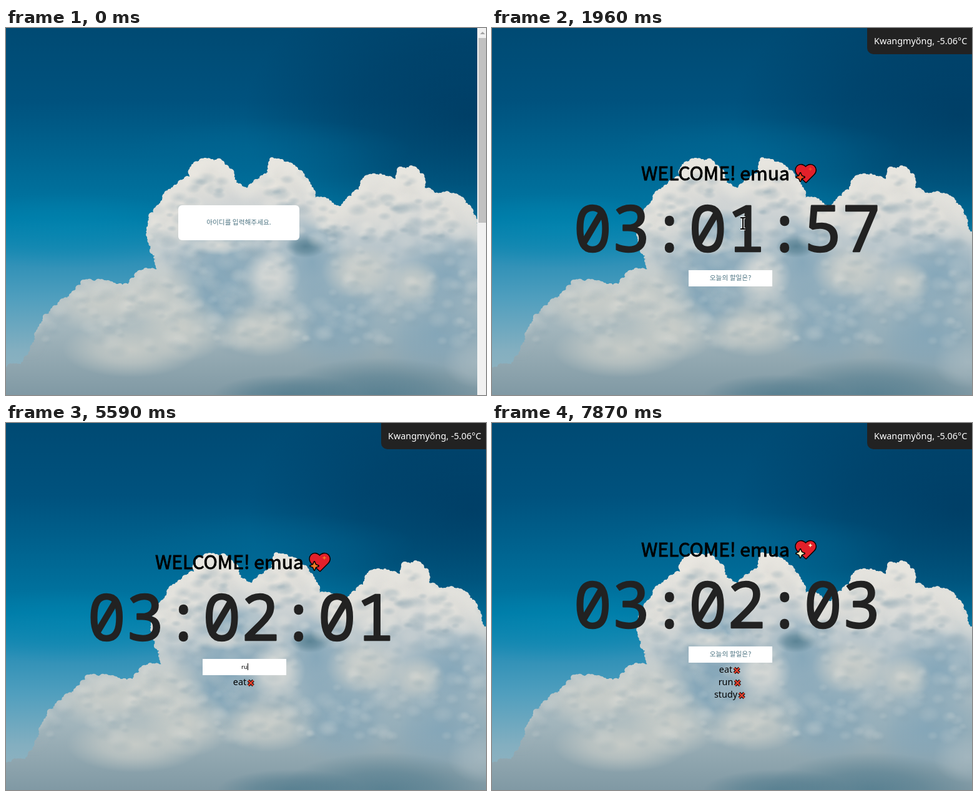
Write an HTML page with a canvas that moves like this. It is 769 by 588 pixels and loops after 8000 ms.

```html
<!DOCTYPE html>
<html lang="ko">
<head>
<meta charset="utf-8">
<title>Clock</title>
<style>
html, body { margin: 0; width: 100%; height: 100%; overflow: hidden; }
canvas { display: block; width: 769px; height: 588px; }
</style>
</head>
<body>
<canvas id="stage" width="769" height="588"></canvas>
<script>
const W = 769, H = 588, LOOP = 8000;
const ctx = document.getElementById('stage').getContext('2d');
const KOREAN = '"Noto Sans CJK KR", "Noto Sans CJK JP", "Noto Sans CJK", sans-serif';
const LATIN = '"Noto Sans", sans-serif';
const BLINK = 530, LOGIN = 1960;
const CLICKS = [610, 3320];
const TICKS = [2160, 3160, 4190, 5190, 6190, 7190];
const ENTRIES = [
  { word: 'emua', keys: [1410, 1510, 1610, 1760], sent: LOGIN },
  { word: 'eat', keys: [4120, 4260, 4390], sent: 4990 },
  { word: 'run', keys: [5460, 5590, 5860], sent: 6260 },
  { word: 'study', keys: [6460, 6660, 6860, 7120, 7340], sent: 7610 }
];
const [visitor, ...todos] = ENTRIES;

let seed = 11;
function random() {
  seed = (seed * 16807) % 2147483647;
  return seed / 2147483647;
}

function verticalGradient(c, stops) {
  const g = c.createLinearGradient(0, 0, 0, H);
  for (const [at, color] of stops) g.addColorStop(at, color);
  return g;
}

// Soft ellipse; rgb is a "r,g,b" string.
function glow(c, x, y, rx, ry, rgb, alpha) {
  c.save();
  c.translate(x, y);
  c.scale(rx, ry);
  const g = c.createRadialGradient(0, 0, 0, 0, 0, 1);
  g.addColorStop(0, `rgba(${rgb},${alpha})`);
  g.addColorStop(0.5, `rgba(${rgb},${alpha * 0.65})`);
  g.addColorStop(1, `rgba(${rgb},0)`);
  c.fillStyle = g;
  c.fillRect(-1, -1, 2, 2);
  c.restore();
}

const RIDGE = [
  [-12, 548], [12, 540], [24, 541], [42, 516], [50, 490], [64, 462], [86, 441], [110, 425],
  [124, 407], [148, 406], [178, 412], [196, 414], [210, 395], [224, 388], [250, 390],
  [240, 372], [232, 345], [227, 325], [234, 300], [249, 284], [258, 264], [276, 251],
  [295, 239], [300, 220], [319, 211], [341, 213], [360, 230], [370, 249], [386, 262],
  [401, 246], [420, 233], [426, 210], [441, 213], [460, 222], [475, 235], [487, 252],
  [494, 274], [515, 275], [534, 292], [547, 276], [570, 256], [573, 241], [600, 235],
  [624, 247], [632, 227], [649, 223], [666, 236], [668, 256], [690, 267], [712, 265],
  [734, 277], [747, 297], [755, 325], [775, 335]
];

function cloudPath() {
  const path = new Path2D();
  path.moveTo(-12, H + 9);
  for (const [x, y] of RIDGE) path.lineTo(x, y);
  path.lineTo(775, H + 9);
  path.closePath();
  for (let i = 1; i < RIDGE.length; i++) {
    const [x0, y0] = RIDGE[i - 1], [x1, y1] = RIDGE[i];
    const count = Math.ceil(Math.hypot(x1 - x0, y1 - y0) / 6);
    for (let k = 0; k < count; k++) {
      const x = x0 + (x1 - x0) * k / count, y = y0 + (y1 - y0) * k / count + 1;
      const r = 2 + random() * 4;
      path.moveTo(x + r, y);
      path.arc(x, y, r, 0, 7);
    }
  }
  return path;
}

const SHADES = [
  ['128,164,184', [[350, 385, 85, 75], [335, 440, 65, 60], [490, 375, 60, 85], [530, 470, 95, 75],
    [705, 395, 80, 70], [690, 490, 100, 70], [365, 320, 50, 30]]],
  ['82,124,142', [[600, 590, 170, 62], [480, 350, 32, 18], [450, 590, 120, 35]]],
  ['226,224,218', [[320, 240, 62, 50], [265, 305, 55, 52], [340, 348, 45, 16], [440, 245, 62, 48],
    [425, 398, 48, 42], [650, 250, 55, 50], [590, 285, 75, 60], [710, 295, 60, 45], [520, 298, 48, 32]]],
  ['206,208,202', [[150, 440, 85, 50], [235, 430, 85, 62], [285, 480, 70, 55], [655, 408, 42, 36],
    [570, 390, 65, 45], [410, 485, 80, 42], [200, 515, 110, 45]]]
];

function paintSky() {
  const canvas = document.createElement('canvas');
  canvas.width = W;
  canvas.height = H;
  const c = canvas.getContext('2d');
  c.fillStyle = verticalGradient(c, [[0, '#004a73'], [0.2, '#00527e'], [0.34, '#00638f'],
    [0.52, '#0079a5'], [0.63, '#2c8fb6'], [0.74, '#519fbe'], [0.88, '#84afc0'], [1, '#97b4bf']]);
  c.fillRect(0, 0, W, H);
  c.translate(7, 0);
  glow(c, 740, 140, 360, 220, '0,56,94', 0.75);
  glow(c, 100, 325, 230, 60, '0,137,180', 0.55);
  glow(c, 420, 195, 230, 50, '0,105,150', 0.4);

  const cloud = cloudPath();
  c.save();
  c.clip(cloud);
  c.fillStyle = verticalGradient(c, [[0.35, '#dddcd8'], [0.5, '#ced3d4'], [0.65, '#adbec6'],
    [0.82, '#a2b5bc'], [1, '#8099a4']]);
  c.fillRect(-12, 0, W + 20, H);
  for (const [rgb, spots] of SHADES)
    for (const spot of spots) glow(c, ...spot, rgb, 0.85);
  for (let i = 0; i < 420; i++) {
    const x = random() * 760, y = 215 + random() * 290, r = 7 + random() * 13;
    const strength = y < 340 ? 0.3 : 0.15;
    glow(c, x, y, r, r * 0.8, '235,232,225', strength);
    glow(c, x + r * 0.5, y + r * 0.8, r, r * 0.6, '130,158,172', strength);
  }
  c.filter = 'blur(6px)';
  c.lineWidth = 16;
  c.strokeStyle = verticalGradient(c, [[0.35, 'rgba(238,235,228,.65)'],
    [0.65, 'rgba(222,222,216,.4)'], [0.9, 'rgba(190,200,200,0)']]);
  c.stroke(cloud);
  c.restore();
  glow(c, 755, 535, 55, 42, '170,188,196', 0.7);
  return canvas;
}

const sky = paintSky();

function write(text, x, y, font, color, align = 'left') {
  ctx.font = font;
  ctx.fillStyle = color;
  ctx.textAlign = align;
  ctx.fillText(text, x, y);
}

function box(x, y, w, h, color, radius = 0) {
  ctx.fillStyle = color;
  ctx.beginPath();
  ctx.roundRect(x, y, w, h, radius);
  ctx.fill();
}

function typed(entry, t) {
  return entry.word.slice(0, entry.keys.filter(k => k <= t).length);
}

function caretOn(t) {
  if (t < CLICKS[0] || (t >= LOGIN && t < CLICKS[1])) return false;
  const resets = [...CLICKS, ...ENTRIES.flatMap(e => e.keys)].filter(k => k <= t);
  return Math.floor((t - Math.max(...resets)) / BLINK) % 2 === 0;
}

function field(value, hint, cx, top, t) {
  let caretX = cx;
  if (value) {
    write(value, cx, top + 9, '9.6px ' + LATIN, '#000', 'center');
    caretX = Math.round(cx + ctx.measureText(value).width / 2);
  } else {
    write(hint, cx, top + 9, '10.7px ' + KOREAN, '#4d7482', 'center');
  }
  if (caretOn(t)) box(caretX, top, 1, 11, '#000');
}

function star(x, y, r, color, outlined) {
  ctx.beginPath();
  for (let i = 0; i < 8; i++) {
    const a = i * Math.PI / 4, d = i % 2 ? r * 0.42 : r;
    ctx.lineTo(x + Math.sin(a) * d, y - Math.cos(a) * d);
  }
  ctx.closePath();
  if (outlined) ctx.stroke();
  ctx.fillStyle = color;
  ctx.fill();
}

function heart(sparkle) {
  ctx.strokeStyle = '#000';
  ctx.lineJoin = 'round';
  ctx.lineWidth = 3;
  ctx.fillStyle = '#e3202a';
  ctx.beginPath();
  ctx.moveTo(503, 247);
  ctx.lineTo(490, 235);
  ctx.bezierCurveTo(481, 225, 493, 213, 502.5, 223);
  ctx.bezierCurveTo(512, 213, 524, 225, 516, 234);
  ctx.closePath();
  ctx.stroke();
  ctx.fill();
  star(494, 239, 6.5, sparkle, true);
  star(510, 226, 3.6, sparkle);
}

function cross(x, y) {
  for (const [width, color] of [[4.6, '#1c1010'], [2.4, '#e8402c']]) {
    ctx.strokeStyle = color;
    ctx.lineWidth = width;
    ctx.beginPath();
    ctx.moveTo(x - 4, y - 4);
    ctx.lineTo(x + 4, y + 4);
    ctx.moveTo(x + 4, y - 4);
    ctx.lineTo(x - 4, y + 4);
    ctx.stroke();
  }
}

function beam(x, y) {
  for (const [width, color] of [[4, '#fff'], [2, '#000']]) {
    ctx.strokeStyle = color;
    ctx.lineWidth = width;
    ctx.beginPath();
    ctx.moveTo(x - 4, y - 9);
    ctx.lineTo(x + 4, y - 9);
    ctx.moveTo(x, y - 9);
    ctx.lineTo(x, y + 9);
    ctx.moveTo(x - 4, y + 9);
    ctx.lineTo(x + 4, y + 9);
    ctx.stroke();
  }
}

function arrow(x, y) {
  ctx.beginPath();
  for (const [dx, dy] of [[0, 0], [0, 16], [4, 12.5], [6.5, 18], [9, 17], [6.5, 11.5], [11.5, 11.5]])
    ctx.lineTo(x + dx, y + dy);
  ctx.closePath();
  ctx.fillStyle = '#fff';
  ctx.fill();
  ctx.strokeStyle = '#000';
  ctx.lineWidth = 1;
  ctx.stroke();
}

// Eased move that advances in ten discrete steps.
function glide(t, start, end, from, to) {
  const p = Math.min(1, Math.max(0, Math.floor((t - start) / (end - start) * 9 + 0.01) / 9));
  const e = 1 - (1 - p) ** 3;
  return from.map((v, i) => v + (to[i] - v) * e);
}

function pointer(t) {
  if (t < 70 || t >= 4120) return;
  const [x, y] = t < LOGIN
    ? glide(t, 70, 700, [603, 517], [402, 313])
    : glide(t, 2690, 3320, [402, 313], [393, 396]);
  const overText = t < LOGIN ? x < 470 && y < 340 : y < 362 || y > 388;
  (overText ? beam : arrow)(x, y);
}

function scrollbar() {
  box(755, 0, 14, H, '#f1f1f1');
  box(757, 16, 12, 296, '#c1c1c1');
  ctx.fillStyle = '#a3a3a3';
  ctx.beginPath();
  ctx.moveTo(759.5, 10);
  ctx.lineTo(763.5, 6);
  ctx.lineTo(767.5, 10);
  ctx.fill();
}

function loginPage(t) {
  ctx.drawImage(sky, -7, 0);
  box(276, 284, 194, 56, '#fff', 6);
  field(typed(visitor, t), '아이디를 입력해주세요.', 373, 306, t);
  scrollbar();
}

function clockText(t) {
  const total = 117 + TICKS.filter(k => k <= t).length;
  const pad = n => String(n).padStart(2, '0');
  return `03:${pad(Math.floor(total / 60))}:${pad(total % 60)}`;
}

function homePage(t) {
  const done = todos.filter(e => e.sent <= t);
  ctx.drawImage(sky, 0, 0);
  box(601, 0, 168, 42, '#222', [0, 0, 0, 10]);
  write('Kwangmyŏng, -5.06°C', 612, 26, '14.4px ' + LATIN, '#fff');

  ctx.save();
  ctx.translate(0, -10 * done.length);
  const title = 'WELCOME! ' + visitor.word;
  write(title, 239, 244, '30px ' + KOREAN, '#000');
  ctx.strokeStyle = '#000';
  ctx.lineWidth = 0.9;
  ctx.strokeText(title, 239, 244);
  heart(['#ee4a22', '#f07a24', '#f58a2a', '#ffeec0'][done.length]);

  const time = clockText(t);
  write(time, 376.5, 358, '102.5px "Noto Sans Mono", monospace', '#222', 'center');
  ctx.strokeStyle = '#222';
  ctx.lineWidth = 2.4;
  ctx.strokeText(time, 376.5, 358);

  box(315, 388, 134, 26, '#fff');
  const current = todos.find(e => e.sent > t);
  field(current ? typed(current, t) : '', '오늘의 할일은?', 382, 395, t);
  done.forEach(({ word }, i) => {
    const y = 430 + 20 * i;
    ctx.font = '14.4px ' + LATIN;
    const width = ctx.measureText(word).width;
    const x = 381 - (width + 13) / 2;
    write(word, x, y, ctx.font, '#000');
    cross(x + width + 7, y - 3.5);
  });
  ctx.restore();
}

function frame(now) {
  const t = now % LOOP;
  (t < LOGIN ? loginPage : homePage)(t);
  pointer(t);
  requestAnimationFrame(frame);
}
requestAnimationFrame(frame);
</script>
</body>
</html>
```
